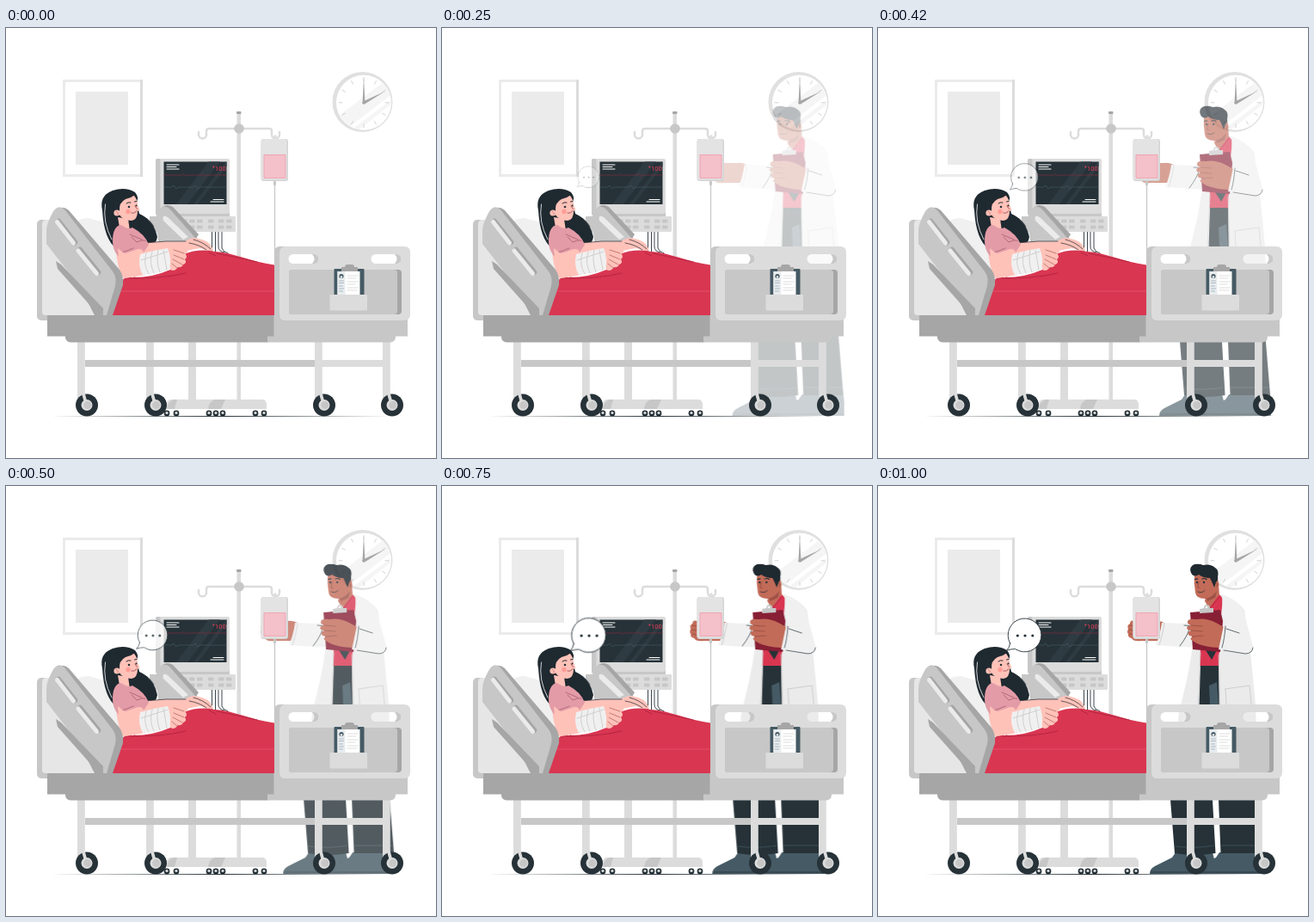
Write an HTML page with a canvas that moves like this. It is 500x500 px and loops after 1040 ms.

```html
<!DOCTYPE html>
<html lang="en">
<head>
<meta charset="utf-8">
<title>Hospital visit</title>
<style>
html, body { margin: 0; width: 100%; height: 100%; overflow: hidden; background: #fff; }
canvas { display: block; width: 500px; height: 500px; }
</style>
</head>
<body>
<canvas id="stage"></canvas>
<script>
const LOOP = 1040, STEP = 1000 / 24;
const dpr = window.devicePixelRatio || 1;
const DARK = '#263238', HAIR = '#1f2930', SKIN = '#ffc2b9', BROWN = '#c26b58', RED = '#d93651';
const G1 = '#ebebeb', G2 = '#dcdcdc', G3 = '#c7c7c7', G4 = '#a6a6a6';
let g;

function setup(canvas) {
  canvas.width = canvas.height = 500 * dpr;
  const ctx = canvas.getContext('2d');
  ctx.scale(dpr, dpr);
  return ctx;
}
function layer(paint) {
  const canvas = document.createElement('canvas');
  g = setup(canvas);
  g.lineCap = g.lineJoin = 'round';
  paint();
  return canvas;
}
function fill(color, d, rule = 'nonzero') {
  g.fillStyle = color;
  g.fill(new Path2D(d), rule);
}
function line(color, width, d) {
  g.strokeStyle = color;
  g.lineWidth = width;
  g.stroke(new Path2D(d));
}
function box(color, x, y, w, h, r = 0) {
  g.fillStyle = color;
  g.beginPath();
  g.roundRect(x, y, w, h, r);
  g.fill();
}
function disc(color, x, y, r) {
  g.fillStyle = color;
  g.beginPath();
  g.arc(x, y, r, 0, 7);
  g.fill();
}
function clipped(path, paint) {
  g.save();
  g.clip(path);
  paint();
  g.restore();
}

function paintWall() {
  box(G2, 66, 60, 93, 113);
  box(G1, 66, 60, 90, 113);
  box('#fff', 69, 63, 87, 107);
  box(G1, 81, 74, 61, 85);

  disc('#e0e0e0', 414.5, 86, 35);
  disc('#fff', 416, 86.8, 32);
  const face = new Path2D();
  face.arc(416, 86.8, 31.5, 0, 7);
  clipped(face, () => {
    fill('#f5f5f5', 'M384 104L440 62L450 76L398 116Z');
    fill('#f5f5f5', 'M402 118L450 82V87L407 121Z');
  });
  for (let i = 0; i < 12; i++) {
    const a = i * Math.PI / 6, x = Math.cos(a), y = Math.sin(a);
    line(G3, .8, `M${416 + 25 * x} ${86.8 + 25 * y}L${416 + 29 * x} ${86.8 + 29 * y}`);
  }
  fill(G4, 'M414.500 88L416 57L417.500 88Z');
  fill(G4, 'M415 85.5L441 73.5L417 88.500Z');
  disc(G4, 416, 87, 1.7);
  fill(DARK, 'M52 451.4L250 450.9L448 451.4L250 451.9Z');
}

function paintDoctor() {
  // legs and shoes
  fill('#455a64', 'M316 451Q316 445 322 442L342 432L346 426H389L391 434L372 447V451Z');
  fill('#455a64', 'M364 451Q364 446 372 442L393 432L397 426H445L446 434V451Z');
  line(DARK, .8, 'M317 449H370M366 449H445');
  fill(DARK, 'M338 340H388L389 366L392.500 427Q368 431 345 427Z');
  fill(DARK, 'M395 340H438L440 366L445 427H398.500Z');
  line('#455a64', .7, 'M346 419Q368 422 391 418M399 418H443');

  // coat body
  fill(G1, 'M385 134L400 126Q418 133 426 144L433 192L439 254L442 340H343L350 262Q361 222 365 192L366 158Z');
  fill(DARK, 'M375 206H396L398 340H371Z');
  fill('#455a64', 'M385 232L394 228L396 256H386Z');
  fill(RED, 'M384 141L397 126L401 131L399 150L396 209H374L377 150Z');
  fill(DARK, 'M381 191L388 202L394 191Z');
  line(G3, .8, 'M404 236L432 232L434 254M404 236L405 254');
  line('#d0d0d0', .8, 'M396 196L398 256M375 194L372 256');

  // raised hand and its sleeve
  fill(BROWN, 'M336 161Q328 156 321 157L299 157Q293 155 293 160Q289 162 291 166Q289 170 291 172Q290 176 295 177Q297 181 306 180H326L336 183Z');
  line('#8f4840', .7, 'M293 162L302 164M292 167L302 169M293 172L301 174');
  fill('#f0f0f0', 'M330 159L357 160Q365 154 371 145L376 151V188L352 187L323 185Q328 173 330 159Z');
  line(DARK, .7, 'M363 163Q361 173 351 186M363 163Q360 162 356 162');
  line(G3, .8, 'M333 160Q331 174 327 185');

  // head
  fill(BROWN, 'M382 122L396 114L397 128L385 142L380 134Z');
  fill('#9e5146', 'M382 130Q389 129 394 122L392 130L383 134Z');
  fill(BROWN, 'M368 102Q367 113 369 124Q370 131 380 131Q389 130 392 121Q398 118 396 112L393 101Z');
  fill(HAIR, 'M364 101Q361 94 368 91Q374 90 378 92Q387 90 392 95Q397 98 395 106Q396 109 393 112L391 118L388 111L386 107Q378 107 373 103Q367 107 364 101Z');
  disc(DARK, 371, 112, 1.2);
  disc(DARK, 379, 112, 1.2);
  line(HAIR, 1.2, 'M368.5 108.5L371.5 107.8M377 108Q380 106.8 382 108.5');
  line('#8f4840', .8, 'M373 112L371.5 118L374 118.5');
  line(DARK, .8, 'M372 123Q377 125 380 121.5');
  line('#8f4840', .8, 'M393 113Q396 113 394 117');
  fill(RED, 'M385 143L396 127L400 132L391 146Z');
  line('#a51f3b', .7, 'M386 142L397 129');

  // near arm and clipboard
  fill('#f0f0f0', 'M400 127Q416 132 424 143Q429 160 436 186Q438 195 427 195L397 191L403 163L401 148Z');
  fill('#871f35', 'M363 147L398 144L401 157L398 193L366 190Z');
  fill(G3, 'M374 143L379 142Q379 138 382 138Q386 138 386 142L390 142V147L374 148Z');
  disc('#fff', 382, 141, 1.2);
  fill(BROWN, 'M402 164L393 159Q382 153 370 155Q360 154 360 158Q360 161 364 162Q357 163 360 167L364 168Q358 170 362 174L366 175Q361 178 366 180Q375 187 397 188Z');
  line('#8f4840', .7, 'M364 162L377 163M364 168L377 169M366 175L378 174');
  fill('#f0f0f0', 'M402 162L411 165L408 192L396 190Z');
  line(DARK, .7, 'M404 163Q403 178 400 188M402 191L427 195Q435 195 436 188M405 166L420 171');
}

function paintMonitor() {
  box(G2, 212, 350, 9, 84);
  box(G2, 268.5, 99, 4.5, 335);
  box(G4, 268, 97, 5.5, 3, 1);
  line(G2, 2.5, 'M233 125V120Q233 117 236 117H306Q309 117 309 120V124A4.5 4.5 0 0 0 318 124V121M233 124A4.5 4.5 0 0 1 224 124V121');
  disc(G3, 271, 117, 5.8);
  box(G2, 187, 432, 64, 11, [5, 5, 0, 0]);
  fill(G3, 'M187 443Q188 434 195 432H199L196 443Z');
  box(G2, 235, 432, 68, 11, [5, 5, 0, 0]);
  fill(G3, 'M235 443Q236 434 243 432H255L250 443Z');
  for (const x of [187, 198, 236, 244, 252, 290, 300]) {
    disc(DARK, x, 448, 3.4);
    disc(G2, x, 447.5, 1.6);
  }

  line(DARK, .9, 'M239.500 236V262M243.500 236V262M247 236V254Q247 260 254 261M251 236V256Q252 260 258 262');
  box(G2, 167, 219, 100, 18, 1);
  box(G3, 167, 219, 14, 18, 1);
  for (let i = 0; i < 7; i++)
    for (const y of [222.5, 229.5]) box(G3, 195 + i * 9 + (i > 4 ? 7 : i > 3 ? 4 : 0), y, 6.5, 4, .8);
  box(G3, 182, 213, 78, 6);
  box(G2, 174, 152, 86, 64, 2);
  box(G3, 174, 152, 5.5, 66, 2);
  box(DARK, 183.5, 155.5, 73, 49.5);
  const screen = new Path2D();
  screen.rect(183.5, 155.5, 73, 49.5);
  clipped(screen, () => {
    fill('#2f3b42', 'M198 205L236 155H249L211 205Z');
    fill('#2f3b42', 'M218 205L256 155H261L223 205Z');
  });
  line('#fff', 1, 'M187 159H201M187 161.500H198M187 164H201M241 199.500H253M238 202H253');
  line('#8d2c40', .6, 'M184 171H205L207 169.500L209 172.500L211 171H227L229 169.500L231 172.500L233 171H256');
  line('#46606a', .6, 'M184 185H193L195 183L198 187L200 185H218L220 183L223 187L225 185H256');
  g.fillStyle = '#e83e57';
  g.font = '7.5px Roboto, Arial, sans-serif';
  g.fillText('100', 243, 165.8);
  disc('#e83e57', 241.3, 161.5, .9);
}

function paintBag() {
  line(G3, 1.3, 'M312.500 178V272');
  box(G3, 311, 178, 3, 5, 1);
  line(G2, 1.6, 'M313 125A3 3 0 0 1 313 130A3 3 0 0 1 313 125');
  box('#d4d4d4', 296.5, 129, 31.500, 49, 3);
  box('#e3e3e3', 296.5, 129, 30, 47.500, 3);
  box('#efa7b4', 299.5, 147, 26, 28, 1);
  box('#f4c0c9', 300.5, 148, 24, 26, 1);
}

function paintBedFrame() {
  for (const x of [83, 163, 359, 438]) {
    box(G2, x, 364, 8.8, 68);
    const cx = x + 11, cy = 438.5;
    disc(DARK, cx, cy, 13);
    disc(G2, cx, cy, 6.5);
    disc(G3, cx + .8, cy, 4.5);
    fill(G2, `M${x + 5} 425H${x + 8.8}L${x + 11} 433L${x + 8} 436Z`);
  }
  box(G3, 92, 386, 267, 8);
  box(G2, 367, 386, 72, 8);
  box(G4, 69, 358, 236, 7.5, [0, 0, 0, 6]);
  box(G3, 304, 358, 149, 7.5, [0, 0, 6, 0]);

  // far rail, headboard and pillow
  fill(G4, 'M174 224L180 210Q186 203 194 208L224 240L218 250L178 250Z');
  fill(G3, 'M172 226L178 211Q183 205 190 210L221 245L216 252H180Z');
  fill(G1, 'M183 224Q181 216 188 220L212 243L206 246Z');
  box(G3, 36, 223, 30, 117, 5);
  fill('#e6e6e6', 'M42 228Q42 223 47 223H62L135 310V334H46Q42 334 42 330Z');
  fill('#f0f0f0', 'M82 227Q84 221 96 221L114 226L134 258V300L120 292Z');
}

function paintPatient() {
  fill(HAIR, 'M112 212Q108 195 124 189Q139 184 150 191Q155 197 152 202L155 216Q172 224 176 243Q174 256 160 250L138 236L128 256Q114 246 112 212Z');
  line('#fff', .8, 'M115.500 205Q112 225 123 246');
  line(HAIR, .7, 'M153 216Q167 221 172 231');

  // far arm
  fill(SKIN, 'M158 250L185 248L208 248Q218 242 224 245Q236 247 240 256Q242 260 237 259L225 256L210 259L160 264Z');
  line(HAIR, .7, 'M161 250L186 248L209 248M218 246Q230 249 238 257M213 250Q225 252 233 258');

  fill(SKIN, 'M130 248L164 250L160 284L136 291Q128 276 128 254Z');
  fill(SKIN, 'M130 220L142 222L144 236L133 238Z');
  fill('#e39ca7', 'M124 248Q124 230 134 229Q142 235 147 232Q162 240 166 252L160 261Q158 254 148 259L130 265Q124 258 124 248Z');
  line('#9c5369', .7, 'M146 243L152 249Q158 246 162 247M131 262Q142 259 148 256M144 240L158 246');

  // head
  fill(SKIN, 'M127 210L134 195H149Q153 200 153 206L155.500 211L153 213Q153 223 146 224Q136 224 131 216Z');
  fill(HAIR, 'M124 211Q123 199 132 191Q146 185 150 194Q145 198 139 199Q131 203 132 213L128 220Z');
  disc(SKIN, 129, 215, 3.6);
  line('#b66b66', .7, 'M128 213Q131 214 130 217');
  disc('#ff9c96', 142, 213.5, 2.7);
  disc(DARK, 143, 208, 1.3);
  disc(DARK, 151.5, 206.5, 1.1);
  line(HAIR, 1, 'M140 204Q142 202 145 203M149.500 202L152 201.500');
  line('#9c4b50', .9, 'M146 215Q150 216 152 212.500M150 207L152.500 210.500');

  // blanket
  fill(RED, 'M123 335L134 297Q136 289 143 290Q169 291 191 281L207 263Q224 256 243 260C264 261 285 272 312 275.500V335Z');
  line('#a51f3b', .7, 'M139 291Q181 292 209 285M245 262Q270 267 292 272M150 284Q146 290 152 291M236 261L244 265');
  line('#e8637a', .6, 'M134 306H312');

  // bandaged forearm and hand
  fill(SKIN, 'M130 256Q145 270 158 264L162 287L139 291Q132 284 130 256Z');
  fill(SKIN, 'M186 257L197 253Q207 251 211 258Q212 262 208 262Q212 266 208 269Q211 273 206 275Q204 279 200 278Q196 284 191 281Z');
  line('#a85c58', .7, 'M195 258L207 262M195 264L207 269M194 269L205 275M193 274L199 279');
  fill('#f0f0f0', 'M156 263Q174 258 188 256Q193 269 190 281Q175 286 159 287Q153 277 156 263Z');
  line(G3, .8, 'M163 262Q159 275 166 286M170 260Q166 273 172 285M177 258Q174 271 179 284M183 258L187 281M157 270L188 260');
}

function paintBed() {
  // near rail
  fill(G4, 'M57 213Q65 205 73 212L132 281Q137 288 136 299L124 334H103L52 236Z');
  fill(G3, 'M47 235Q47 228 54 215Q60 204 68 211L124 283Q129 290 127 300L117 334H112L47 251Z');
  line(G4, 6.5, 'M61 225L80 249M86 258L107 284');
  line(G1, 5, 'M59.500 225.500L78.500 250M84 259L105.500 285.500');
  fill(G4, 'M58 271L64 275L113 326V334H108L60 280Z');

  box(G4, 48, 334, 264, 24.500);
  box(G3, 311.5, 334, 155.500, 24.500);

  // footboard with two open grips
  const grip = x => `M${x + 5} 263H${x + 29}A5.500 5.500 0 0 1 ${x + 29} 274H${x + 5}A5.500 5.500 0 0 1 ${x + 5} 263Z`;
  const board = 'M319 254H463Q470 254 470 261V333Q470 340 463 340H319Q312 340 312 333V261Q312 254 319 254Z' + grip(329) + grip(425);
  fill(G2, board, 'evenodd');
  fill(G3, 'M319 254H324Q318 255 318 262V333Q318 339 323 340H319Q312 340 312 333V261Q312 254 319 254Z');
  for (const x of [329, 425])
    fill(G3, `M${x + 27} 263H${x + 29}A5.500 5.500 0 0 1 ${x + 29} 274H${x + 27}Q${x + 32} 268.500 ${x + 27} 263Z`);
  box(G4, 329, 281, 131, 52, 4);
  box(G3, 329, 281, 126, 52, 4);

  // chart
  box('#455a64', 381.5, 280, 35, 36, 1);
  box('#fff', 385.5, 283, 26, 32);
  box('#e8ecee', 385.5, 283, 9, 32);
  disc('#455a64', 390, 288.5, 2.6);
  disc('#fff', 390, 289.5, 1.3);
  line('#90a4ae', .7, 'M387.500 294H392.500M387.500 296.500H392.500M387.500 300H391.500M387.500 303H392.500M387.500 306H391.500');
  line(G3, .6, 'M397 288H409M397 291H407M397 295H409M397 298H406M397 302H409M397 305H408');
  fill(G4, 'M390 283V278H394Q394 275 397 275H402Q405 275 405 278H409V283Z');
  box(G2, 376.5, 310, 43.500, 18.500, 1);
}

function paintFront() {
  paintMonitor();
  paintBag();
  paintBedFrame();
  paintPatient();
  paintBed();
}

function paintBubble() {
  const d = 'M153.600 183A19.400 19.400 0 1 1 159.600 189.500Q154.500 189.500 149.500 191.300Q153 188 153.600 183Z';
  fill('#fff', d);
  line(DARK, .9, d);
  for (const x of [162.3, 171, 179.8]) disc(DARK, x, 174, 1.6);
}

const [wall, doctor, front, bubble] = [paintWall, paintDoctor, paintFront, paintBubble].map(layer);

// cubic-bezier(.36, -.01, .5, 1.38)
function ease(x) {
  if (x >= 1) return 1;
  const at = (s, a, b) => 3 * (1 - s) * (1 - s) * s * a + 3 * (1 - s) * s * s * b + s * s * s;
  let lo = 0, hi = 1;
  for (let i = 0; i < 24; i++) {
    const mid = (lo + hi) / 2;
    if (at(mid, .36, .5) < x) lo = mid; else hi = mid;
  }
  return at(lo, -.01, 1.38);
}

const stage = setup(document.getElementById('stage'));
const put = image => stage.drawImage(image, 0, 0, 500, 500);

function draw(t) {
  const k = Math.floor((t + 3.4) / STEP);
  const p = k < 3 ? 0 : ease((k * STEP + 28) / 1000);
  const alpha = Math.max(0, Math.min(1, p));
  stage.fillStyle = '#fff';
  stage.fillRect(0, 0, 500, 500);
  put(wall);

  stage.save();
  stage.globalAlpha = alpha;
  stage.translate(30 * (1 - p), 0);
  put(doctor);
  stage.restore();

  put(front);

  stage.save();
  stage.globalAlpha = alpha;
  stage.translate(170, 173);
  stage.scale(.5 + p / 2, .5 + p / 2);
  stage.translate(-170, -173);
  put(bubble);
  stage.restore();
}

const start = performance.now();
function tick() {
  draw((performance.now() - start) % LOOP);
  requestAnimationFrame(tick);
}
tick();
</script>
</body>
</html>
```
